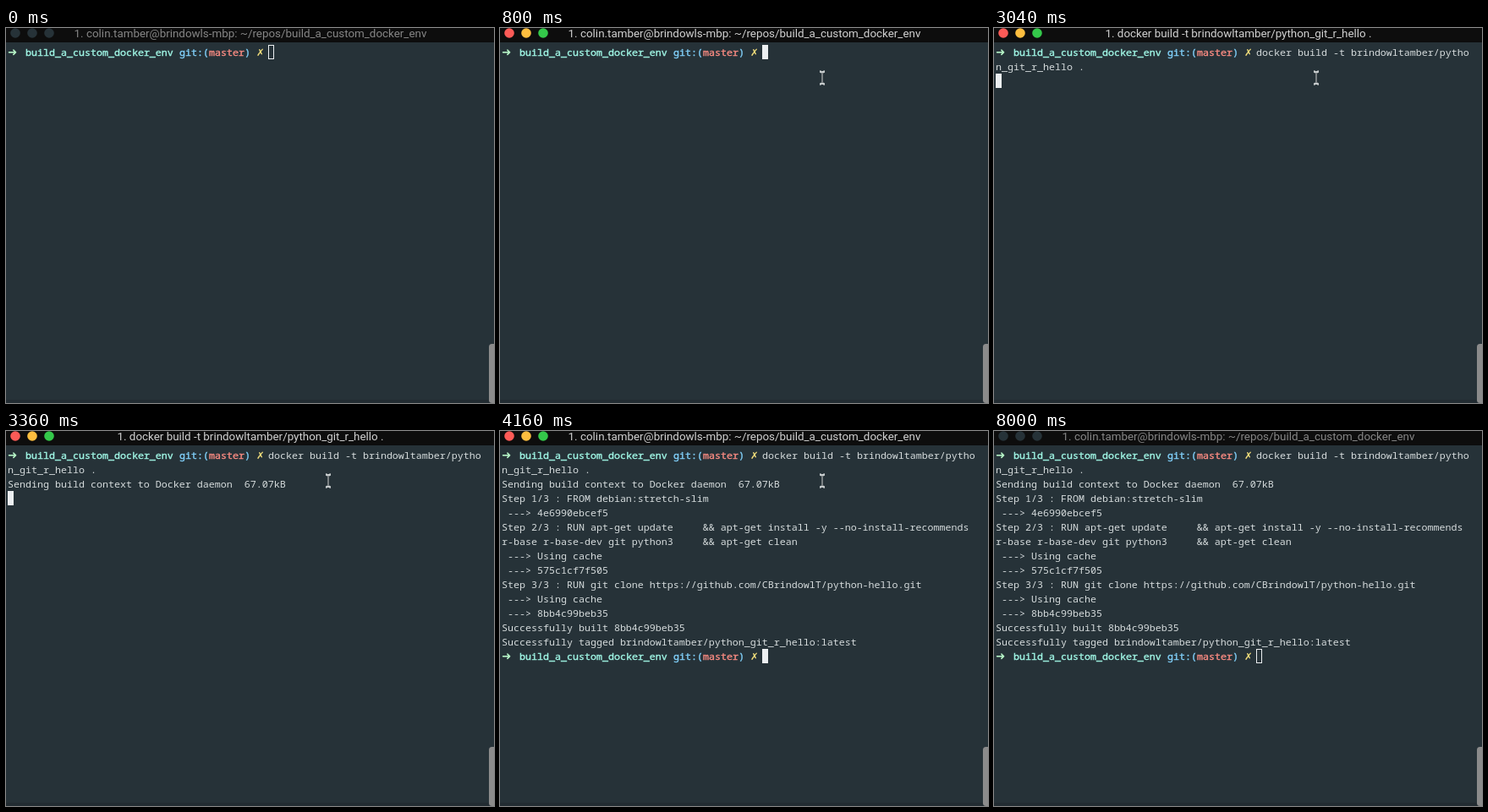
An HTML page that plays this animation: 577x444 px, repeating every 8160 ms.

```html
<!DOCTYPE html>
<html lang="en">
<head>
<meta charset="utf-8">
<title>Terminal</title>
<style>
  html, body { margin: 0; width: 100%; height: 100%; overflow: hidden; background: #263238; }
  svg { display: block; width: 100vw; height: 100vh; }
  text { white-space: pre; }
  .term text { font: 11.667px "Noto Sans Mono", "DejaVu Sans Mono", monospace; fill: #d6dcdd; }
  .term .bold { stroke-width: .4px; }
  .term .sign { font-family: "DejaVu Sans", sans-serif; font-weight: 700; }
  #title { font: 13.4px Roboto, "Open Sans", sans-serif; text-anchor: middle; }
</style>
</head>
<body>
<svg viewBox="0 0 577 444">
  <rect width="577" height="444" fill="#263238"/>
  <rect y="440" width="577" height="4" fill="#222c32"/>
  <rect width="577" height="17" fill="#0d0d0d"/>
  <g id="lights"></g>
  <text id="title" x="289" y="11"></text>
  <g class="term">
    <g id="marks"></g>
    <rect id="caret" width="6" height="16"/>
    <g id="screen"></g>
  </g>
  <rect x="571" y="374" width="10" height="70" rx="3.5" fill="#8b8b8b"/>
  <g id="pointer" fill="none">
    <path id="beam" d="M-3-7.5Q0-7.5 0-5Q0-7.5 3-7.5M0-5V5M-3 7.5Q0 7.5 0 5Q0 7.5 3 7.5" stroke="#c9cecf" stroke-width="1.9"/>
    <use href="#beam"/>
    <path d="M0-6V6" stroke="#1b2226" stroke-width=".9"/>
  </g>
</svg>
<script>
const LOOP = 8160, COL = 7, ROW = 17;
const ACTIVE = 640, PASTE = 1760, ENTER = 3040, SEND = 3360, DONE = 3520, BLUR = 8000;

const repo = "build_a_custom_docker_env";
const image = "brindowltamber/python_git_r_hello";
const command = `docker build -t ${image} .`;
const shellTitle = `1. colin.tamber@brindowls-mbp: ~/repos/${repo}`;
const output = [
  "Sending build context to Docker daemon  67.07kB",
  "Step 1/3 : FROM debian:stretch-slim",
  " ---> 4e6990ebcef5",
  "Step 2/3 : RUN apt-get update     && apt-get install -y --no-install-recommends",
  "r-base r-base-dev git python3     && apt-get clean",
  " ---> Using cache",
  " ---> 575c1cf7f505",
  "Step 3/3 : RUN git clone https://github.com/CBrindowlT/python-hello.git",
  " ---> Using cache",
  " ---> 8bb4c99beb35",
  "Successfully built 8bb4c99beb35",
  `Successfully tagged ${image}:latest`
];

// [time, x, y]; a missing position hides the pointer
const moves = [
  [0], [160, 428, 156], [320, 423, 150], [480, 392, 73], [640, 384, 69],
  [800, 381, 59], [7200, 382, 83], [7360, 377, 200], [7520, 376, 372], [7680]
];

const $ = id => document.getElementById(id);

function add(parent, tag, attrs, content = "") {
  const el = document.createElementNS("http://www.w3.org/2000/svg", tag);
  for (const key in attrs) el.setAttribute(key, attrs[key]);
  el.textContent = content;
  parent.append(el);
  return el;
}

function set(el, attrs) {
  for (const key in attrs) el.setAttribute(key, attrs[key]);
}

const show = (el, on) => set(el, { visibility: on ? "visible" : "hidden" });

function write(parent, col, row, content) {
  return add(parent, "text", { x: 2 + col * COL, y: 33 + row * ROW }, content);
}

function bold(parent, col, row, content, color) {
  const el = write(parent, col, row, content);
  set(el, { class: "bold" });
  el.style.fill = el.style.stroke = color;
}

function sign(parent, col, row, content, color, size) {
  const el = write(parent, col, row, content);
  set(el, { class: "sign" });
  el.style.fill = color;
  el.style.fontSize = size + "px";
}

function prompt(parent, row) {
  sign(parent, 0, row, "➜", "#b5f3c6", 13.5);
  bold(parent, 3, row, repo, "#9ff5e4");
  bold(parent, 29, row, "git:(", "#80d0fa");
  bold(parent, 34, row, "master", "#f98b82");
  bold(parent, 40, row, ")", "#80d0fa");
  sign(parent, 42, row, "✗", "#f6e07c", 11.5);
}

const screen = $("screen"), marks = $("marks");
prompt(screen, 0);
const typed = add(screen, "g", {});
write(typed, 44, 0, command.slice(0, 36));
write(typed, 0, 1, command.slice(36));
const sent = add(screen, "g", {});
write(sent, 0, 2, output[0]);
const rest = add(screen, "g", {});
output.slice(1).forEach((line, i) => write(rest, 0, i + 3, line));
prompt(rest, 14);

add(marks, "rect", { x: 310, y: 20, width: 252, height: 17, fill: "#d9dcdc" });
add(marks, "rect", { x: 2, y: 37, width: 105, height: 17, fill: "#d9dcdc" });

const lights = ["#fc5b57", "#fdbe3f", "#34c84a"].map((color, i) => ({
  color, el: add($("lights"), "circle", { cx: 11 + i * 20, cy: 6, r: 5.8 })
}));

function caretCell(t) {
  if (t < PASTE) return [44, 0];
  if (t < ENTER) return [15, 1];
  if (t < SEND) return [0, 2];
  if (t < DONE) return [0, 3];
  return [44, 14];
}

function draw(t) {
  const active = t >= ACTIVE && t < BLUR;
  const selected = t >= PASTE && t < ENTER;

  for (const { el, color } of lights) set(el, { fill: active ? color : "#263238" });
  $("title").textContent = t >= ENTER && t < DONE ? `1. ${command}` : shellTitle;
  set($("title"), { fill: active ? "#d2d2d2" : "#868686" });

  show(marks, selected);
  show(typed, t >= PASTE);
  show(sent, t >= SEND);
  show(rest, t >= DONE);
  for (const line of typed.children) line.style.fill = selected ? "#354045" : "";

  const [col, row] = caretCell(t), x = 2 + col * COL, y = 20 + row * ROW;
  set($("caret"), active
    ? { x, y, width: 7, height: 17, fill: "#eceff1", stroke: "none" }
    : { x: x + .5, y: y + .5, width: 6, height: 16, fill: "none", stroke: "#eceff1" });

  const [, px, py] = moves.findLast(move => move[0] <= t);
  show($("pointer"), px !== undefined);
  if (px !== undefined) set($("pointer"), { transform: `translate(${px} ${py})` });
}

const start = performance.now();
function tick() {
  draw((performance.now() - start) % LOOP);
  requestAnimationFrame(tick);
}
draw(0);
requestAnimationFrame(tick);
</script>
</body>
</html>
```
